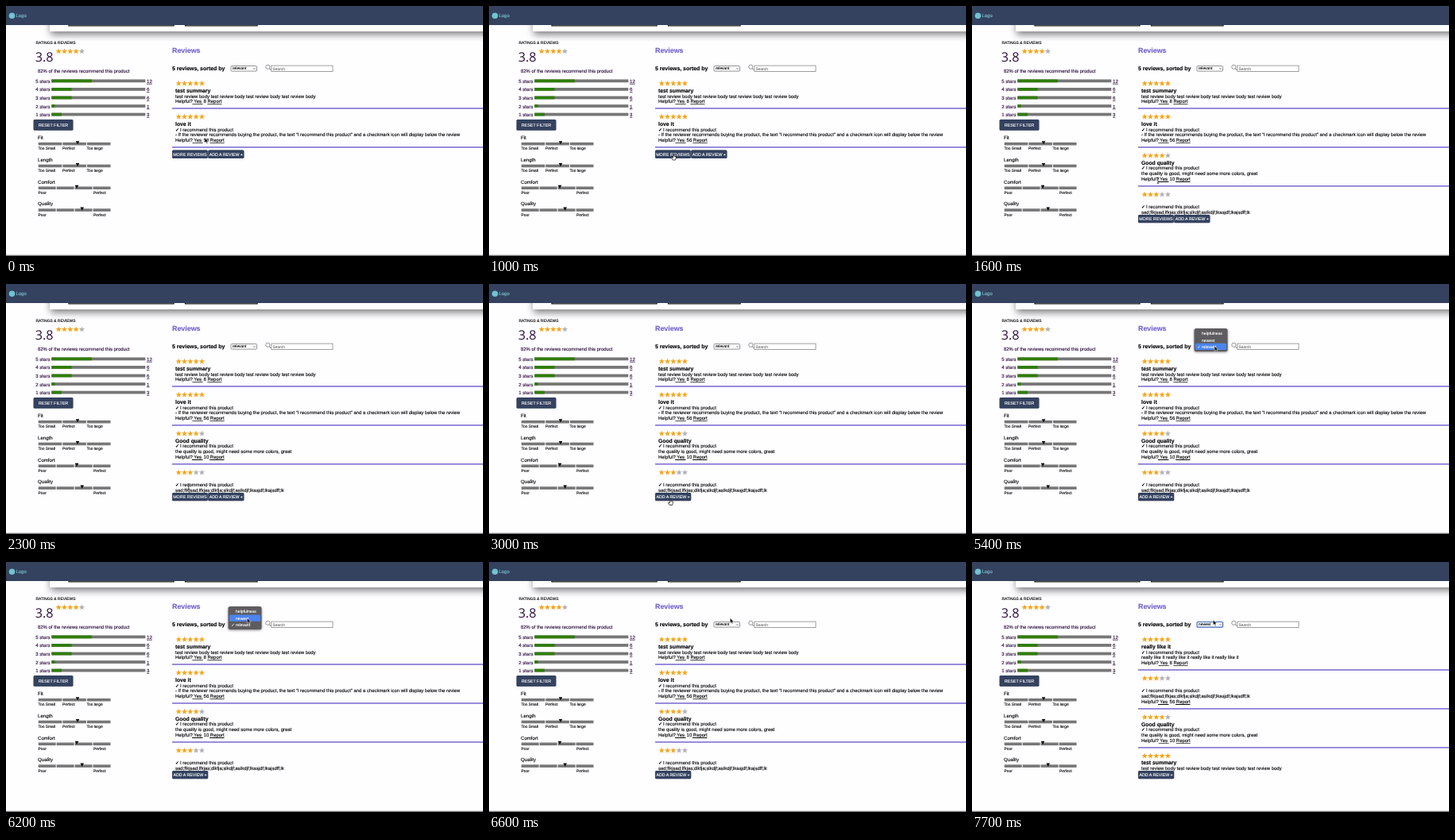
Write an HTML page that moves like this. It is 600 px wide and 315 px high and loops after 7800 ms.

```html
<!DOCTYPE html>
<html lang="en">
<head>
<meta charset="utf-8">
<title>Ratings and reviews</title>
<style>
  html, body { margin: 0; width: 100%; height: 100%; overflow: hidden; background: #fefdff; }
  svg { display: block; width: 600px; height: 315px; }
  text { font: 5.95px "Liberation Sans", Arial, sans-serif; color: #080808; fill: currentColor; stroke: currentColor; stroke-width: .13px; white-space: pre; text-rendering: geometricPrecision; }
  .bold { font-weight: bold; font-size: 6.8px; color: #000; }
  .link { text-decoration: underline; }
  .purple { color: #2e1240; }
  .score { font: 16.2px "Open Sans", "Noto Sans", sans-serif; stroke: none; }
  .tick { font-size: 5.6px; stroke-width: .35px; }
  .small { font-size: 4.85px; }
  .button rect { fill: #34425f; filter: drop-shadow(0 .6px .6px #0006); }
  .button text { color: #fff; text-anchor: middle; }
</style>
</head>
<body>
<svg id="stage" viewBox="0 0 600 315">
  <defs>
    <filter id="soft" x="-10%" y="-100%" width="120%" height="300%"><feGaussianBlur stdDeviation="5"/></filter>
    <clipPath id="listClip"><rect id="listWindow" x="205" y="88" width="395" height="175"/></clipPath>
  </defs>
  <rect width="600" height="315" fill="#fefdff"/>

  <rect x="56" y="5" width="570" height="31" fill="#000" opacity=".5" filter="url(#soft)"/>
  <rect x="55" y="0" width="545" height="32" fill="#fff"/>
  <path d="M79 20V24.900H211V20M225.500 20V24.900H316V20" fill="none" stroke="#111" stroke-width="1.300"/>
  <rect width="600" height="24" fill="#34425f"/>
  <circle cx="7.500" cy="12.300" r="3.800" fill="#6fc3cf"/>
  <text x="12.500" y="14.200" style="color:#7fc4d0">Logo</text>
  <rect y="313.700" width="600" height="1.300" fill="#77777b"/>

  <g id="panel"></g>

  <text class="bold" x="209" y="58.800" style="font-size:8.900px;color:#7262cf">Reviews</text>
  <text class="bold" x="209" y="81.200" style="font-size:6.950px">5 reviews, sorted by</text>
  <rect id="selectBox" x="283" y="75.500" width="32.500" height="6.600" rx="1" fill="#fff" stroke="#666" stroke-width=".7"/>
  <text id="selectText" class="small" x="285" y="80.400">relevant</text>
  <path d="M311 78.200l1.300 1.400 1.300-1.400" fill="none" stroke="#333" stroke-width=".6"/>
  <path d="M331.300 78.800l2.400 2.400" stroke="#444" stroke-width=".8"/>
  <circle cx="329.300" cy="76.800" r="2.600" fill="none" stroke="#555" stroke-width=".6"/>
  <rect x="333.800" y="75.100" width="77.200" height="7.300" fill="#fff" stroke="#777" stroke-width=".7"/>
  <text class="small" x="335.600" y="80.500" style="color:#777">Search</text>

  <g clip-path="url(#listClip)">
    <g id="relevantList"></g>
    <g id="newestList"></g>
  </g>
  <g id="buttons"></g>

  <g id="menu">
    <rect x="279.500" y="56" width="42" height="29" rx="2.500" fill="#5e5c60" style="filter:drop-shadow(0 1px 1.500px #0007)"/>
    <rect id="highlight" x="281" width="39" height="8.200" rx="1.500" fill="#4b84ee"/>
  </g>

  <g id="cursor">
    <path id="arrow" d="M0 0V6.500L1.500 5.100 2.500 7.400 3.600 6.900 2.600 4.800H4.600Z" fill="#000" stroke="#fff" stroke-width=".5"/>
    <path id="hand" d="M-.6 .6Q0-.3 .6 .6V3L3.200 3.700V6L2.500 8H-.9L-2.700 5.300-2 4.600-.6 5.500Z" fill="#fff" stroke="#000" stroke-width=".7"/>
    <path id="beam" d="M-1.300-3.600Q0-3.600 0-2.800V2.800Q0 3.600-1.300 3.600M1.300-3.600Q0-3.600 0-2.800M0 2.800Q0 3.600 1.300 3.600" fill="none" stroke="#222" stroke-width=".8"/>
  </g>
</svg>

<script>
const LOOP = 7800, STEP = 100;
const $ = id => document.getElementById(id);
const add = (parent, markup) => parent.insertAdjacentHTML("beforeend", markup);
const text = (x, y, body, cls = "", size) =>
  `<text class="${cls}" x="${x}" y="${y}"${size ? ` style="font-size:${size}px"` : ""}>${body}</text>`;
const rect = (x, y, w, h, fill) => `<rect x="${x}" y="${y}" width="${w}" height="${h}" fill="${fill}"/>`;

function star(cx, cy, fill) {
  const points = Array.from({ length: 10 }, (_, i) => {
    const r = i % 2 ? 1.65 : 3.8, a = (i / 5 - 0.5) * Math.PI;
    return `${(cx + r * Math.cos(a)).toFixed(2)},${(cy + r * Math.sin(a)).toFixed(2)}`;
  });
  return `<polygon points="${points.join(" ")}" fill="${fill}"/>`;
}
const stars = (x, y, count) =>
  [0, 1, 2, 3, 4].map(i => star(x + i * 7.3, y, i < count ? "#f5a61d" : "#b3b0b8")).join("");

const button = (x, y, w, h, label, size) =>
  `<g class="button"><rect x="${x}" y="${y}" width="${w}" height="${h}" rx="1.5"/>` +
  text(x + w / 2, y + h / 2 + size * 0.36, label, "", size) + "</g>";

function drawPanel() {
  const panel = $("panel"), gray = "#777";
  add(panel, text(37.5, 47.6, "RATINGS &amp; REVIEWS", "", 4.9) +
    text(36.8, 69.8, "3.8", "purple score") + stars(66.2, 57.2, 4) +
    text(40, 83.8, "82% of the reviews recommend this product", "purple"));

  const votes = [12, 6, 6, 1, 3];
  votes.forEach((count, i) => {
    const y = 94.5 + i * 10.55;
    add(panel, text(37.2, y + 2.4, `${5 - i} stars`, "purple", 6.1) +
      rect(57.3, y - 2, 118, 3.8, gray) + rect(57.3, y - 2, 118 * count / 28, 3.8, "#2f7d0a") +
      text(177, y + 2.4, count, "purple link", 6.1));
  });
  add(panel, button(34.6, 142.9, 49.8, 13.9, "RESET FILTER", 5.4));

  const sizes = [[40.5, "Too Small"], [71, "Perfect"], [101.5, "Too large"]];
  const grades = [[40.5, "Poor"], [110, "Perfect"]];
  const traits = [["Fit", 90, sizes, 3], ["Length", 90, sizes, 3], ["Comfort", 89, grades, 4], ["Quality", 95.7, grades, 4]];
  traits.forEach(([name, mark, labels, parts], i) => {
    const y = 173.7 + i * 27.8, pitch = 91.8 / parts;
    add(panel, text(40, y - 5.8, name, "", 6.1));
    for (let k = 0; k < parts; k++) add(panel, rect(40.7 + k * pitch, y - 1.8, pitch - 1, 3.6, gray));
    add(panel, `<path d="M${mark - 2.3} ${y - 3.5}h4.6l-2.3 4.1z"/>` +
      labels.map(([x, label]) => text(x, y + 7.5, label, "", 4.9)).join(""));
  });
}

function drawList(list, cards) {
  let y = 97.6;
  cards.forEach(({ score, title, tick, body }, i) => {
    const helpful = [8, 56, 10, 6][i];
    let line = y + 17.9;
    add(list, stars(217.2, y, score) + text(213, y + 11, title, "bold"));
    if (tick) {
      add(list, text(213, line, "✓", "tick") + text(219, line, "I recommend this product"));
      line += 6.95;
    }
    add(list, text(213, line, body) + text(213, line + 6.95,
      `Helpful?<tspan class="link"> Yes </tspan><tspan dx=".9">${helpful} </tspan><tspan class="link">Report</tspan>`));
    add(list, rect(209, line + 12.6, 391, 1.8, "#8d80da"));
    y = line + 24.1;
  });
}

function drawMenu() {
  ["helpfulness", "newest", "relevant"].forEach((label, i) =>
    add($("menu"), `<text x="289" y="${64.3 + i * 8.2}" style="color:#fff;font-size:5.1px">${label}</text>`));
  add($("menu"), `<text x="283.5" y="80.8" style="color:#fff;font-size:5px">✓</text>`);
}

const repeat = phrase => Array(4).fill(phrase).join(" ");
const summary = { score: 5, title: "test summary", body: repeat("test review body") };
const love = { score: 5, title: "love it", tick: true,
  body: "- If the reviewer recommends buying the product, the text “I recommend this product” and a checkmark icon will display below the review" };
const good = { score: 4, title: "Good quality", tick: true, body: "the quality is good, might need some more colors, great" };
const keys = { score: 3, title: "", tick: true, body: "sad;flkjsad;lfkjas;dlkfja;slkdjf;aslkdjf;lkasjdf;lkajsdff;lk" };
const really = { score: 5, title: "really like it", tick: true, body: repeat("really like it") };

drawPanel();
drawList($("relevantList"), [summary, love, good, keys]);
drawList($("newestList"), [really, keys, good, summary]);
drawMenu();
add($("buttons"), `<g id="more">${button(209, 0, 44.8, 10.3, "MORE REVIEWS", 5.4)}</g>` +
  `<g id="addReview">${button(254.2, 0, 45.2, 10.3, "ADD A REVIEW +", 5.25)}</g>`);

// Pointer stops: time, x, y
const path = [[0, 250, 166], [800, 232, 186], [1200, 232, 186], [1600, 234, 220], [1950, 234, 220],
  [2500, 228, 270.5], [3500, 228, 270.5], [4400, 300, 84.7], [4700, 304, 78], [5100, 304, 78],
  [5400, 305, 78], [5800, 305, 78], [6200, 303.3, 70.6], [7400, 303.3, 70.6], [7700, 303.3, 73], [LOOP, 303.3, 73]];

function pointerAt(t) {
  const i = path.findIndex(stop => stop[0] > t);
  const [t0, x0, y0] = path[i - 1], [t1, x1, y1] = path[i];
  const u = (t - t0) / (t1 - t0), e = u * u * (3 - 2 * u);
  return [x0 + (x1 - x0) * e, y0 + (y1 - y0) * e];
}
const pointerKind = t =>
  (t >= 700 && t < 1400) || (t >= 2400 && t < 3700) ? "hand" : t >= 1400 && t < 2400 ? "beam" : "arrow";
const show = (id, on) => { $(id).style.display = on ? "" : "none"; };

function render(now) {
  const t = Math.floor(now % LOOP / STEP) * STEP;
  const expanded = t >= 1200, allShown = t >= 2800, newest = t >= 6700;

  $("listWindow").setAttribute("height", expanded ? 175 : 91.5);
  show("relevantList", !newest);
  show("newestList", newest);
  $("buttons").setAttribute("transform", `translate(0 ${expanded ? 263 : 181.6})`);
  show("more", !allShown);
  $("addReview").setAttribute("transform", `translate(${allShown ? -45.2 : 0} 0)`);

  show("menu", t >= 5100 && t < 6400);
  $("highlight").setAttribute("y", t < 6000 ? 74.8 : 66.6);
  $("selectText").textContent = newest ? "newest" : "relevant";
  $("selectBox").setAttribute("stroke", newest ? "#3f66b5" : "#666");
  $("selectBox").setAttribute("stroke-width", newest ? 1.2 : 0.7);

  const [x, y] = pointerAt(t), kind = pointerKind(t);
  $("cursor").setAttribute("transform", `translate(${x.toFixed(2)} ${y.toFixed(2)})`);
  ["arrow", "hand", "beam"].forEach(id => show(id, id === kind));
}

const start = performance.now();
(function tick() {
  render(performance.now() - start);
  requestAnimationFrame(tick);
})();
</script>
</body>
</html>
```
